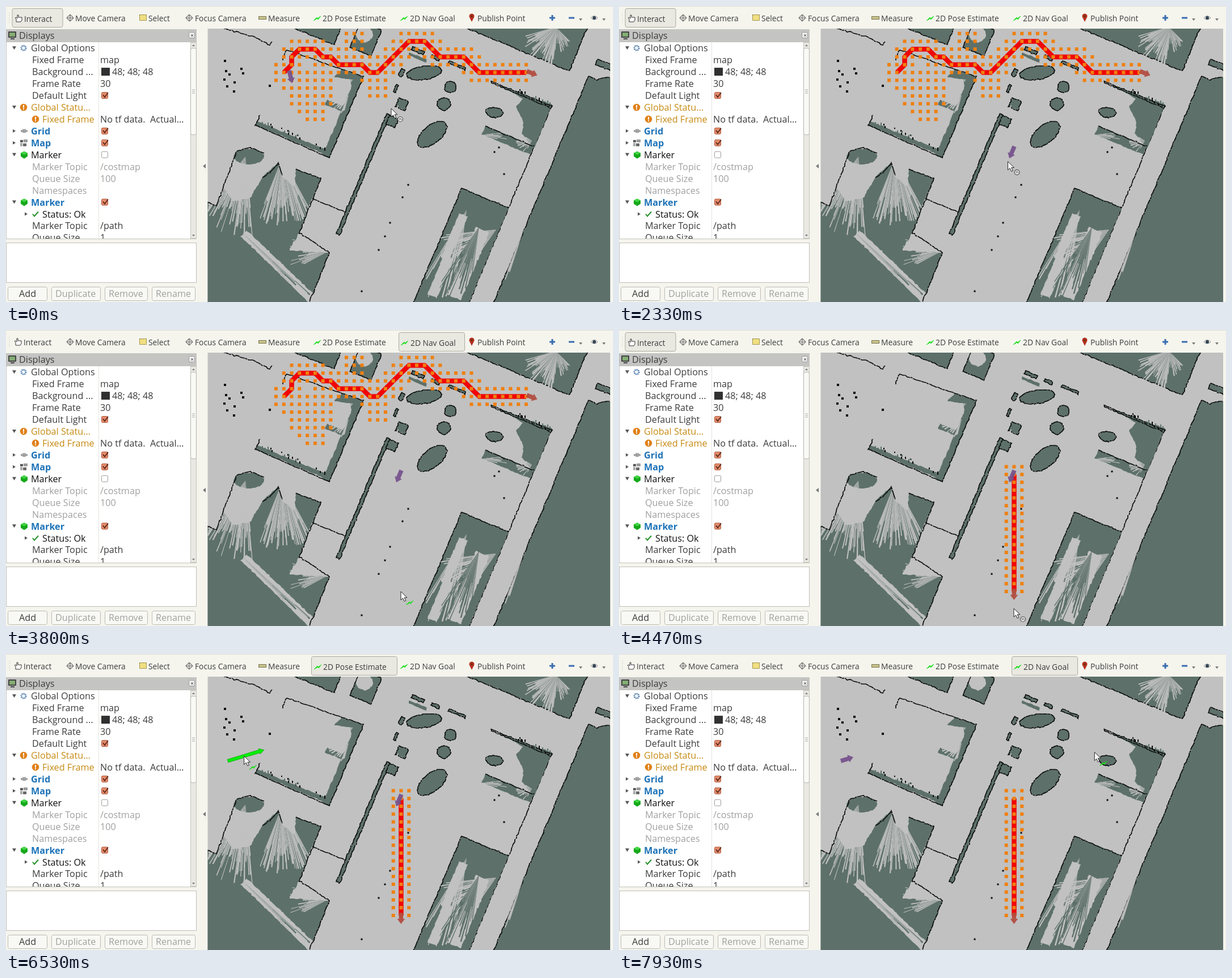
These frames come from a looping animation (1070 px wide and 523 px high, 8 s). An HTML page with a canvas:

```html
<!DOCTYPE html>
<html lang="en">
<head>
<meta charset="utf-8">
<title>Map planner</title>
<style>
html, body { margin: 0; width: 100%; height: 100%; overflow: hidden; background: #f5f5ee; }
canvas, svg { position: absolute; left: 0; top: 0; width: 1070px; height: 523px; }
text { font-family: "Open Sans", "Noto Sans", sans-serif; font-size: 16.2px; fill: #3c3c3c; white-space: pre; }
.tool text { font-size: 13.8px; }
</style>
</head>
<body>
<canvas id="map" width="1070" height="523"></canvas>
<svg id="ui" viewBox="0 0 1070 523"></svg>
<script>
const FREE = '#c1c1c1', UNKNOWN = '#5d706a', WALL = '#090b0a';
const g = document.getElementById('map').getContext('2d');
const svg = document.getElementById('ui');
const RAD = Math.PI / 180;
let seed = 7;
const rnd = () => (seed = (seed * 16807) % 2147483647) / 2147483647;
const pts = s => s.split(' ').map(p => p.split(',').map(Number));

// ---- Map: the building is turned by a fixed angle ----
const C = Math.cos(22.7 * RAD), S = Math.sin(22.7 * RAD);
const tilt = (x, y, w, h) => [[x, y], [x + w * C, y + w * S], [x + w * C - h * S, y + w * S + h * C], [x - h * S, y + h * C]];
const oval = (x, y, rx, ry, deg = 0) => Array.from({ length: 16 }, (_, i) => {
  const a = i * Math.PI / 8, c = Math.cos(deg * RAD), s = Math.sin(deg * RAD);
  return [x + rx * Math.cos(a) * c - ry * Math.sin(a) * s, y + rx * Math.cos(a) * s + ry * Math.sin(a) * c];
});

// Outline with pixel-sized irregularities
function rough(points, closed) {
  const path = new Path2D(), all = closed ? [...points, points[0]] : points;
  path.moveTo(...all[0]);
  for (let i = 1; i < all.length; i++) {
    const [px, py] = all[i - 1], [x, y] = all[i], n = Math.ceil(Math.hypot(x - px, y - py) / 4);
    for (let k = 1; k <= n; k++)
      path.lineTo(Math.round(px + (x - px) * k / n + rnd() * 1.6 - .8), Math.round(py + (y - py) * k / n + rnd() * 1.6 - .8));
  }
  return path;
}
function wall(points, closed = false) {
  g.strokeStyle = WALL; g.lineWidth = 1.7;
  g.setLineDash([9, .8, 4, 1.2, 15, .6]);
  g.stroke(rough(points, closed));
}
function area(points, color = UNKNOWN) { g.fillStyle = color; g.fill(rough(points, true)); }
function block(points) { area(points); wall(points, true); }

// Sensor rays from a point, angles in degrees
function fan(x, y, from, to, near, far, color = FREE) {
  const count = Math.ceil((to - from) * far / 110);
  g.fillStyle = color;
  for (let i = 0; i < count; i++) {
    const a = (from + (to - from) * (i + rnd()) / count) * RAD, r = near + (far - near) * rnd(), w = (.5 + rnd()) / far;
    g.beginPath(); g.moveTo(x, y);
    g.lineTo(x + r * Math.cos(a - w), y + r * Math.sin(a - w));
    g.lineTo(x + r * Math.cos(a + w), y + r * Math.sin(a + w));
    g.fill();
  }
}
function speckle(x, y, length, count) {
  for (let i = 0; i < count; i++) {
    const d = rnd() * length;
    g.fillStyle = rnd() < .5 ? WALL : UNKNOWN;
    g.fillRect(Math.round(x + d * C), Math.round(y + d * S - rnd() * 8), 2, 2 + rnd() * 4);
  }
}
function dots(s, size) {
  g.fillStyle = WALL;
  for (const [x, y] of pts(s)) g.fillRect(x - size / 2, y - size / 2, size, size);
}

function drawMap() {
  g.beginPath(); g.rect(355.5, 40, 709.5, 483); g.clip();
  g.fillStyle = FREE; g.fillRect(355, 40, 710, 483);

  // right side
  block(pts('1027,124 1042,131 1056,126 1080,128 1080,540 853,540'));
  fan(918, 378, 108, 115, 70, 128);
  wall(tilt(962, 175, 0, 380).slice(1, 3));
  block(tilt(1043, 94, 40, 10));
  block(tilt(812, 39, 196, -90));
  fan(972, 36, 95, 164, 35, 76);
  fan(972, 40, 45, 95, 15, 45);

  // upper middle
  block(tilt(508, 39, 76, -40));
  block(tilt(606, 73, 40, -50));
  area(oval(632, 50, 15, 14), FREE);
  wall(pts('384,40 435,54 465,69 469,62'));
  block(tilt(717, 72, 22, 6));
  block(tilt(751, 86, 15, 5));
  block(tilt(781, 97, 32, 4));
  area(tilt(711, 82, 34, 5));
  block(tilt(697, 110, 7, 14));
  block(tilt(688, 139, 4, 14));
  block(oval(737, 118, 32, 12, -8));
  block(oval(783, 143, 10, 10));
  block(oval(772, 173, 12, 11));
  block(tilt(693, 162, 18, 17));
  block(tilt(676, 193, 17, 17));
  fan(686, 196, 200, 290, 10, 28);
  block(oval(751, 227, 31, 16, -40));

  // left room and the long partition
  area(pts('592,112 630,125 612,160 606,130 578,126'));
  area(tilt(618, 121, 13, 155));
  area(tilt(442, 203, 141, 8));
  area(tilt(566, 165, 36, 10));
  fan(612, 130, 130, 185, 14, 36);
  fan(604, 158, 105, 195, 12, 38);
  wall(pts('488,96 494,77 592,112 630,125 570,268 440,211 448,192'));
  speckle(448, 206, 125, 24);
  block(tilt(671, 190, 6, 230));

  // lower left
  area(pts('355,347 371,353 385,322 400,345 430,340 452,302 480,277 487,302 509,320 511,288 555,305 540,340 517,401 499,432 570,436 530,535 345,535'));
  area(oval(428, 266, 27, 14));
  fan(422, 266, 84, 128, 65, 140);
  fan(487, 268, 62, 112, 70, 122);
  fan(569, 433, 152, 200, 32, 72);
  area(pts('424,397 432,403 545,512 536,526 414,407'), FREE);
  fan(418, 402, 42, 47, 60, 165, UNKNOWN);
  fan(418, 402, 42, 47, 60, 165);
  wall(pts('355,347 371,353 407,256 430,250 455,260'));
  wall(pts('452,303 465,295 480,277 487,300'));
  wall(pts('511,288 555,305 517,401 570,436 535,523'));
  wall(tilt(540, 340, 63, 0).slice(0, 2));

  // lower middle room
  const room = tilt(803, 322, 90, 230);
  area(room);
  area(tilt(799, 366, 16, 85), FREE);
  area(tilt(828, 390, 26, 130), FREE);
  area(tilt(772, 440, 18, 75), FREE);
  fan(812, 360, 98, 122, 60, 170);
  fan(864, 395, 125, 175, 25, 100);
  fan(834, 390, 98, 125, 50, 140, UNKNOWN);
  wall([room[3], room[0], room[1]]);

  // right cluster
  area(pts('866,138 962,174 931,252 909,225 913,207 899,178 911,164'));
  area(tilt(845, 212, 92, 16));
  fan(840, 228, -12, 18, 10, 48);
  fan(927, 238, 120, 210, 8, 28);
  block(oval(861, 188, 15, 9, 8));
  wall(tilt(856, 133, 115, 3), true);
  wall(tilt(845, 212, 92, 0).slice(0, 2));
  speckle(895, 150, 70, 18);

  dots('386,97 388,115 394,121 415,111 418,119 385,130 390,142 403,135 402,151 465,141', 4);
  dots('709,316 699,338 677,383 668,407 657,431 627,504 869,250 861,258 878,297', 3);
}
drawMap();

// ---- Interface ----
const rect = (x, y, w, h, fill, extra = '') => `<rect x="${x}" y="${y}" width="${w}" height="${h}" fill="${fill}" ${extra}/>`;
const path = (d, fill, extra = '') => `<path d="${d}" fill="${fill}" ${extra}/>`;
const circle = (x, y, r, fill, extra = '') => `<circle cx="${x}" cy="${y}" r="${r}" fill="${fill}" ${extra}/>`;
const text = (x, y, s, fill = '#3c3c3c', extra = '') => `<text x="${x}" y="${y}" style="fill:${fill}" ${extra}>${s}</text>`;
const stroke = (c, w = 1) => `stroke="${c}" stroke-width="${w}"`;
const needle = (x, y) => path(`M${x} ${y}l6-6 1 2 6-4-5 6-1-2z`, '#20dd20', stroke('#20dd20', .8));
const cross = x => path(`M${x} 21h12m-6-6v12m-3-9l3-3 3 3m-6 6l3 3 3-3m-6-6l-3 3 3 3m6-6l3 3-3 3`, 'none', stroke('#777', 1.2)) + circle(x + 6, 21, 2, '#999');
const hand = path('M17 27v-5l-2-2 2-1 2 2v-6h2v4h6v5l-2 3z', '#fff', stroke('#333'));
const pressable = (id, x, w, label, tx, icon) =>
  rect(x, 4.5, w, 33, '#e9e8e1', `id="${id}Box" rx="3" stroke="#aaa9a2"`) + `<g id="${id}">${icon}${text(tx, 26.5, label)}</g>`;

function toolbar() {
  return '<g class="tool">' + rect(0, 0, 1070, 1, '#dddcd5') +
    path('M6 12v20', 'none', 'stroke="#ccc" stroke-dasharray="2 2"') +
    pressable('interact', 11, 89, 'Interact', 31, hand) +
    cross(107) + text(122, 26.5, 'Move Camera') +
    rect(235.5, 15.5, 12, 10, '#f0df80', 'stroke="#776a20" stroke-dasharray="2 1"') + text(251, 26.5, 'Select') +
    cross(317) + text(333, 26.5, 'Focus Camera') +
    rect(445.5, 18.5, 13, 5, '#c9c38d', stroke('#77734a')) + text(462, 26.5, 'Measure') +
    pressable('pose', 538.5, 151, '2D Pose Estimate', 558, needle(542, 26)) +
    pressable('nav', 692.5, 116, '2D Nav Goal', 712, needle(695, 26)) +
    path('M821 28l-4-8a4.5 4.5 0 1 1 8 0z', '#b5301e') + circle(821, 18, 1.6, '#531') + text(831, 26.5, 'Publish Point') +
    path('M958 21h10m-5-5v10M992 21h10', 'none', stroke('#3b6db0', 3)) +
    path('M1010 22h6l-3 4zM1051 22h6l-3 4z', '#777') +
    path('M1031 21q6-7 12 0q-6 6-12 0z', '#fff', stroke('#888')) + circle(1037, 21, 3, '#345') + '</g>';
}

const GRAY = '#a0a0a0', AMBER = '#c58a12', BLUE = '#1d73b8', INK = '#3c3c3c';
const icons = {
  gear: y => circle(31, y, 4, 'none', 'stroke="#5b86b5" stroke-width="3" stroke-dasharray="2 1"'),
  warn: (y, x = 31) => circle(x, y, 6.3, '#e08119') + rect(x - 1, y - 4, 2, 5, '#fff') + rect(x - 1, y + 2, 2, 2, '#fff'),
  warn2: y => icons.warn(y, 52),
  grid: y => path(`M26 ${y}l6-3 6 3-6 3zM29 ${y - 1.5}l6 3m0-3l-6 3`, 'none', stroke('#555')),
  map: y => rect(25, y - 5, 5, 4, '#555') + rect(31, y - 6, 7, 5, '#999') + rect(25, y, 4, 6, '#aaa') + rect(30, y + 1, 6, 5, '#666'),
  cube: y => path(`M26 ${y - 3}l6-3 6 3v6l-6 4-6-4z`, '#16a81c') + path(`M26 ${y - 3}l6-3 6 3-6 3z`, '#42d544'),
  tick: y => path(`M47 ${y}l3 4 7-8`, 'none', stroke('#23912a', 2)),
};
// label, x, colour, value, icon, expander ('v' open, '>' closed), checkbox
const rows = [
  ['Global Options', 44, INK, '', 'gear', 'v'],
  ['Fixed Frame', 46, INK, 'map'],
  ['Background ...', 46, INK, '48; 48; 48'],
  ['Frame Rate', 46, INK, '30'],
  ['Default Light', 46, INK, '', '', '', 1],
  ['Global Statu…', 44, AMBER, '', 'warn', 'v'],
  ['Fixed Frame', 64, AMBER, 'No tf data.  Actual…', 'warn2'],
  ['Grid', 44, BLUE, '', 'grid', '>', 1],
  ['Map', 44, BLUE, '', 'map', '>', 1],
  ['Marker', 44, '#111', '', 'cube', 'v', 0],
  ['Marker Topic', 46, GRAY, '/costmap'],
  ['Queue Size', 46, GRAY, '100'],
  ['Namespaces', 46, GRAY, ''],
  ['Marker', 44, BLUE, '', 'cube', 'v', 1],
  ['Status: Ok', 64, '#111', '', 'tick', '>'],
  ['Marker Topic', 46, INK, '/path'],
  ['Queue Size', 46, INK, '1'],
];
function row([label, x, color, value, icon, expander, check], i) {
  const y = 74.2 + i * 20.95, ex = icon === 'tick' ? 35 : 14, swatch = label.startsWith('Back');
  let out = text(x, y + 6, label, color, color === BLUE ? 'font-weight="bold"' : '');
  if (value) out += text(swatch ? 187 : 166, y + 6, value, color === GRAY ? GRAY : INK);
  if (swatch) out += rect(168, y - 7, 15, 14, '#303030');
  if (icon) out += icons[icon](y);
  if (expander === 'v') out += path(`M${ex - 3} ${y - 3}h7l-3.5 6z`, '#555');
  if (expander === '>') out += path(`M${ex - 2} ${y - 3}v6l5-3z`, '#555');
  if (check !== undefined) out += rect(168.5, y - 5.5, 11, 11, check ? '#e58b6b' : '#fff', `rx="2" stroke="${check ? '#a9593f' : '#999'}"`);
  if (check) out += path(`M171 ${y - 1}l3 4 6-8`, 'none', stroke('#59291c', 1.8));
  return out;
}
function panel() {
  const button = (x, w, label, tx, color) =>
    rect(x + .5, 496.5, w, 24, '#f8f8f4', 'rx="3" stroke="#bcbbb3"') + text(tx, 514, label, color);
  return rect(0, 41, 336, 22, '#c4c4c2') + rect(4, 45, 14, 11, '#444', 'rx="1"') + rect(6, 47, 10, 7, '#83ad74') + rect(8, 57, 7, 2, '#444') +
    text(23, 57.5, 'Displays') + rect(322.5, 46.5, 10, 10, '#eee', 'rx="2" stroke="#999"') + path('M326 50l4 4m0-4l-4 4', 'none', stroke('#555')) +
    rect(.5, 63.5, 335, 348, '#fff', 'stroke="#c5c4bd"') + rect(163, 64, 1, 347, '#e4e4e0') +
    `<clipPath id="tree"><rect x="1" y="64" width="324" height="347"/></clipPath><g clip-path="url(#tree)">${rows.map(row).join('')}</g>` +
    rect(325.5, 64.5, 10, 346, '#e9e8e3', 'stroke="#c5c4bd"') + rect(325.5, 74.5, 10, 153, '#f8f8f5', 'rx="3" stroke="#b5b4ad"') +
    path('M328 71l2.5-3 2.5 3zM328 404l2.5 3 2.5-3z', '#777') + path('M328 148h5m-5 3h5m-5 3h5', 'none', stroke('#aaa')) +
    rect(.5, 418.5, 335, 70, '#fff', 'stroke="#bfbeb7"') +
    button(3, 69, 'Add', 23, INK) + button(80, 86, 'Duplicate', 87, GRAY) + button(174, 75, 'Remove', 181, GRAY) + button(257, 76, 'Rename', 264, GRAY) +
    path('M352 279v8l-5-4z', '#777');
}

// ---- Plans on the search grid: every expanded cell opens its eight neighbours ----
const gx = k => 476 + 13.78 * k, gy = j => 48.6 + 13.78 * j;
function cellsAlong(nodes) {
  const cells = [nodes[0]];
  for (const [k, j] of nodes.slice(1)) {
    let [a, b] = cells[cells.length - 1];
    while (a !== k || b !== j) cells.push([a += Math.sign(k - a), b += Math.sign(j - b)]);
  }
  return cells;
}
function plan(id, route, ...detours) {
  const nodes = pts(route), open = new Set();
  const expanded = [cellsAlong(nodes).slice(0, -1), ...detours.map(d => cellsAlong(pts(d)))].flat();
  for (const [k, j] of expanded)
    for (let n = 0; n < 9; n++) open.add([k - 1 + n % 3, j - 1 + Math.floor(n / 3)].join());
  const squares = [...open].map(c => c.split(',')).map(([k, j]) => rect(gx(k) - 3, gy(j) - 3, 6, 6, '#ef8010')).join('');
  return `<g id="${id}">${path('M' + nodes.map(([k, j]) => gx(k) + ' ' + gy(j)).join('L'), 'none', stroke('#f00505', 8.5))}${squares}</g>`;
}
const arrow = (id, color, len, w, extra = '') =>
  path(`M0 ${-w}H${len - 9}V${-w * 1.8}L${len} 0L${len - 9} ${w * 1.8}V${w}H0z`, color, `id="${id}" ${extra}`);

svg.innerHTML = toolbar() + panel() +
  plan('oldPlan', '1,5 2,4 2,3 3,2 5,2 6,3 7,3 8,4 11,4 12,5 13,5 17,1 19,1 21,3 24,3 26,5 32,5', '2,6 6,6 6,8 3,8 5,10', '13,6 13,7', '10,1 10,1') +
  plan('newPlan', '16,15 16,30') +
  arrow('goal', '#b24a3e', 20, 3.8, 'opacity=".92"') +
  arrow('robot', '#76528c', 23, 3.8, 'opacity=".94"') +
  arrow('drag', '#08ee08', 67, 2.8, stroke('#0a9a0a', .6)) +
  `<g id="cursor">${path('M0 0V15l3.6-3.2 2.6 5.6 2.6-1.2-2.6-5.4h4.8z', '#fff', stroke('#222'))}
   <g id="spin">${circle(16, 19, 4.5, '#ddd', stroke('#555', 1.2))}${path('M13 17l6 3m-5 1l3-4', 'none', stroke('#777'))}</g>
   <g id="mark">${needle(9, 24)}</g></g>`;

// ---- Motion: pick a tool, press on the map, drag out a direction, release ----
const LOOP = 8000, REACH = 30;
const buttonX = { pose: 612, nav: 748 };
const actions = [
  { tool: 'pose', click: 850, down: 1550, up: 1880, x: 697, y: 248, deg: 113 },
  { tool: 'nav', click: 3080, down: 3950, up: 4400, x: 696, y: 462, deg: 90 },
  { tool: 'pose', click: 5600, down: 6200, up: 6740, x: 391, y: 189, deg: -17 },
  { tool: 'nav', click: 7540, down: 8150, up: 8600, x: 841, y: 178, deg: 0 },
];
const start = { up: -350, x: 499, y: 114, deg: 76 };

// Each leg: start, end, target
const legs = [];
let rest = start.up + 450;
for (const a of actions) {
  const reached = a.click - 130;
  legs.push([Math.min(rest, reached - 500), reached, buttonX[a.tool], 23],
    [a.click + 60, a.down - 150, a.x, a.y],
    [a.down, a.up - 200, a.x + REACH * Math.cos(a.deg * RAD), a.y + REACH * Math.sin(a.deg * RAD)]);
  rest = a.up + 450;
}
function cursorAt(t) {
  let x = 679, y = 181;
  for (const [t0, t1, tx, ty] of legs) {
    const f = Math.min(1, Math.max(0, (t - t0) / (t1 - t0))), e = f * (2 - f);
    x += (tx - x) * e;
    y += (ty - y) * e;
  }
  return [x, y];
}

const el = id => document.getElementById(id);
const show = (id, on) => el(id).setAttribute('visibility', on ? 'visible' : 'hidden');
const place = (id, x, y, deg = 0) => el(id).setAttribute('transform', `translate(${x} ${y}) rotate(${deg})`);

function draw(now) {
  const t = now % LOOP, [x, y] = cursorAt(t);
  const active = actions.find(a => t >= a.click && t < a.up), tool = active ? active.tool : 'interact';
  for (const id of ['interact', 'pose', 'nav']) {
    show(id + 'Box', tool === id);
    place(id, +(tool === id), +(tool === id));
  }
  const robot = actions.filter(a => a.tool === 'pose' && t >= a.up).pop() || start;
  place('robot', robot.x, robot.y, robot.deg);
  const replanned = t >= actions[1].up + 70;
  show('oldPlan', !replanned);
  show('newPlan', replanned);
  if (replanned) place('goal', 696.4, 457, 90); else place('goal', 918, 115, 22);
  const dragging = active && t > active.down + 40;
  show('drag', dragging);
  if (dragging) place('drag', active.x, active.y, active.deg);
  place('cursor', x, y);
  show('spin', !active && y > 40);
  show('mark', active && y > 40);
  requestAnimationFrame(draw);
}
draw(0);
</script>
</body>
</html>
```
